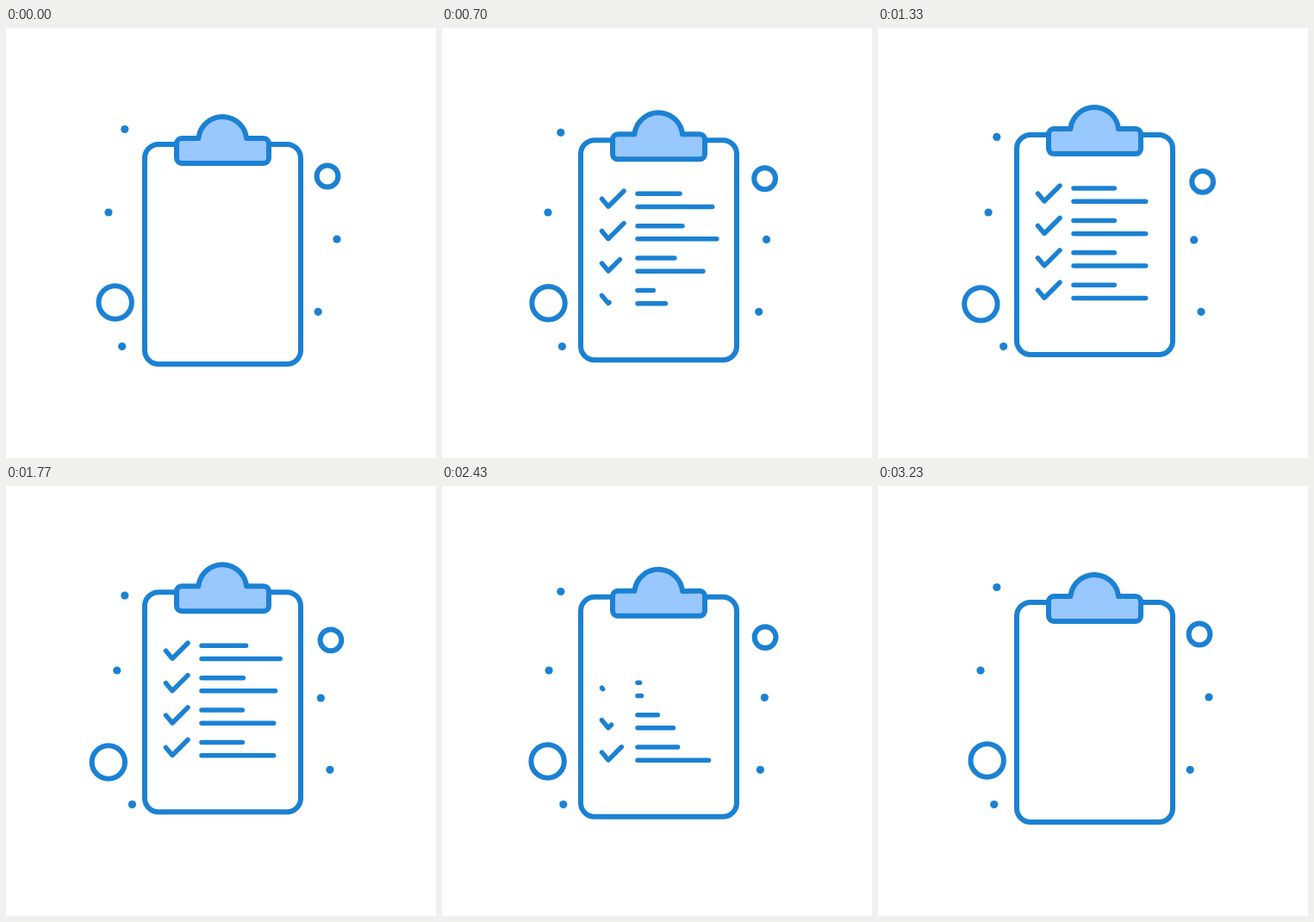
An HTML page with a canvas for the animation above (3260 ms loop, 499x499 px).

```html
<!DOCTYPE html>
<html lang="en">
<head>
<meta charset="utf-8">
<title>Checklist</title>
<style>
html, body { margin: 0; width: 100%; height: 100%; overflow: hidden; background: #fff; }
canvas { display: block; width: 100vw; height: 100vh; }
</style>
</head>
<body>
<canvas id="stage" width="499" height="499"></canvas>
<script>
const ctx = document.getElementById('stage').getContext('2d');
const LOOP = 3260;
const STEP = 100 / 3;
const BLUE = '#1b81d3';
const LIGHT = '#99c7ff';

// Start position, travel and radius of the floating shapes
const dots = [
  { x: 137.8, y: 117.5, dx: 0, dy: 9.8 },
  { x: 119, y: 214, dx: 10, dy: 0 },
  { x: 134.7, y: 369.6, dx: 12, dy: 0 },
  { x: 384, y: 245, dx: -19, dy: 1 },
  { x: 362.2, y: 329.3, dx: 14, dy: 0 }
];
const rings = [
  { x: 126.7, y: 318.5, dx: -8, dy: 2, r: 19.2 },
  { x: 373, y: 172, dx: 4, dy: 7, r: 12.4 }
];

const clamp = v => Math.min(1, Math.max(0, v));
const ease = v => { v = clamp(v); return v * v * (3 - 2 * v); };

function circle(s, k, r) {
  ctx.beginPath();
  ctx.arc(s.x + s.dx * k, s.y + s.dy * k, r, 0, Math.PI * 2);
}

function line(y, length) {
  ctx.beginPath();
  ctx.moveTo(227, y);
  ctx.lineTo(227 + length, y);
  ctx.stroke();
}

function check(y, part) {
  const first = Math.hypot(7.5, 9);
  const second = Math.hypot(18, 18);
  const length = part * (first + second);
  const a = clamp(length / first);
  const b = clamp((length - first) / second);
  ctx.beginPath();
  ctx.moveTo(185.5, y);
  ctx.lineTo(185.5 + 7.5 * a, y + 9 * a);
  if (b > 0) ctx.lineTo(193 + 18 * b, y + 9 - 18 * b);
  ctx.stroke();
}

function row(i, time) {
  // Rows enter in turn, then leave by running the same motion backwards
  const delay = i * 500 / 3;
  const age = Math.min(time - delay, 7000 / 3 + delay - time);
  const local = time < 1400 ? time - delay : 7000 / 3 - (time - delay);
  if (local <= 0 || age < -1e4) return;
  const grow = ease(local / 500);
  const stretch = 1.1 * grow - 0.1 * ease((local - 500) / (1000 / 3));
  const y = 197 + i * 37.4;
  check(y + 6, grow);
  line(y, 47.3 * stretch);
  line(y + 15.2, 83.7 * stretch);
}

function board() {
  ctx.lineWidth = 6;
  ctx.beginPath();
  ctx.roundRect(161, 135, 181, 255, 16);
  ctx.stroke();

  ctx.beginPath();
  ctx.moveTo(204, 128);
  ctx.lineTo(223.3, 128);
  ctx.arc(251.2, 131, 28, Math.PI + 0.107, -0.107);
  ctx.lineTo(299, 128);
  ctx.arcTo(305, 128, 305, 134, 6);
  ctx.arcTo(305, 157, 299, 157, 6);
  ctx.arcTo(198, 157, 198, 151, 6);
  ctx.arcTo(198, 128, 204, 128, 6);
  ctx.closePath();
  ctx.fillStyle = LIGHT;
  ctx.fill();
  ctx.stroke();
}

function draw(time) {
  const k = ease(1 - Math.abs(time / (LOOP / 2) - 1));
  ctx.fillStyle = '#fff';
  ctx.fillRect(0, 0, 499, 499);
  ctx.strokeStyle = BLUE;
  ctx.lineCap = ctx.lineJoin = 'round';

  ctx.fillStyle = BLUE;
  for (const d of dots) { circle(d, k, 4.6); ctx.fill(); }
  ctx.lineWidth = 6;
  for (const r of rings) { circle(r, k, r.r); ctx.stroke(); }

  ctx.save();
  ctx.translate(0, -12 * k);
  board();
  ctx.lineWidth = 5.5;
  for (let i = 0; i < 4; i++) row(i, time);
  ctx.restore();
}

function tick() {
  const now = performance.now() % LOOP;
  const count = Math.floor(Math.floor(now / 10) * 0.3 + 0.15);
  draw(count * STEP);
  requestAnimationFrame(tick);
}
tick();
</script>
</body>
</html>
```
